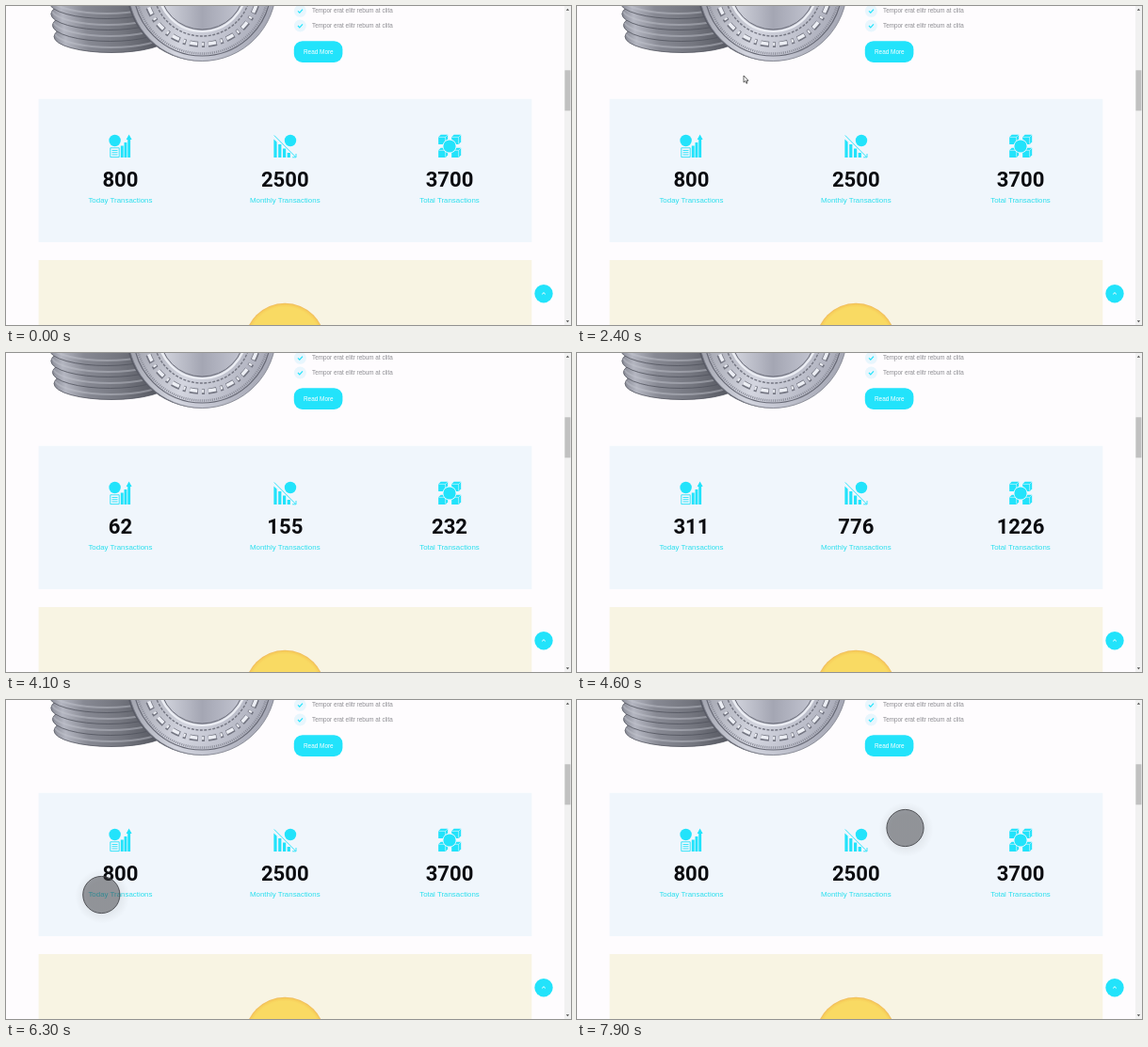
Recreate the animation shown at these times as an HTML page. Size 600 px wide and 339 px high, loop 8 s.

```html
<!DOCTYPE html>
<html lang="en">
<head>
<meta charset="utf-8">
<title>Transaction counters</title>
<style>
  html, body { margin: 0; width: 100%; height: 100%; overflow: hidden; background: #fefcfe; }
  svg { display: block; width: 100vw; height: 100vh; }
  text { font-family: "Liberation Sans", Arial, sans-serif; }
  .num { font: 600 22.1px Roboto, sans-serif; fill: #0b0c10; text-anchor: middle; }
  .label { font-size: 7.9px; fill: #2bdfee; text-anchor: middle; }
  .item { font-size: 6.35px; fill: #8d8d92; }
  .cy { fill: #22e3fb; }
  .line { fill: none; stroke: #22e3fb; }
</style>
</head>
<body>
<svg viewBox="0 0 600 339" preserveAspectRatio="none">
  <defs>
    <linearGradient id="side">
      <stop offset="0" stop-color="#8b8d98"/>
      <stop offset=".1" stop-color="#b4b6c1"/>
      <stop offset=".3" stop-color="#878993"/>
      <stop offset=".6" stop-color="#74767f"/>
      <stop offset="1" stop-color="#4d4f58"/>
    </linearGradient>
    <linearGradient id="face" x1="0" y1=".6" x2="1" y2="1">
      <stop offset="0" stop-color="#a0a2ad"/>
      <stop offset=".4" stop-color="#d3d5df"/>
      <stop offset=".65" stop-color="#bfc1cd"/>
      <stop offset="1" stop-color="#9597a5"/>
    </linearGradient>
    <linearGradient id="inner" x1="0" y1="0" x2="1" y2="0">
      <stop offset="0" stop-color="#d8dae3"/>
      <stop offset=".5" stop-color="#a4a6b3"/>
      <stop offset="1" stop-color="#c6c8d4"/>
    </linearGradient>
    <radialGradient id="gold">
      <stop offset=".9" stop-color="#f9da63"/>
      <stop offset=".96" stop-color="#f7cf5b"/>
      <stop offset="1" stop-color="#efb95c"/>
    </radialGradient>
    <radialGradient id="shade">
      <stop offset=".55" stop-color="#444" stop-opacity=".1"/>
      <stop offset="1" stop-color="#444" stop-opacity="0"/>
    </radialGradient>
  </defs>

  <g id="stack"></g>

  <!-- large silver coin -->
  <g fill="none">
    <circle cx="206.5" cy="-20.5" r="79" fill="#595b66"/>
    <circle cx="208.3" cy="-20" r="78.5" fill="url(#face)" stroke="#7d7f8b" stroke-width=".8"/>
    <circle cx="208.3" cy="-20" r="73" stroke="#676975" stroke-width="1.2"/>
    <circle cx="208.3" cy="-20" r="70.500" stroke="#8a8c98" stroke-width="2.400" stroke-dasharray="1 1.200"/>
    <circle cx="208.3" cy="-20" r="61" stroke="#747682" stroke-width="6" stroke-dasharray="9 4 3 4"/>
    <circle cx="208.3" cy="-20" r="60.500" stroke="#eceef4" stroke-width="3.600" stroke-dasharray="8 5 2 5"/>
    <circle cx="208.3" cy="-20" r="52" stroke="#747682" stroke-width="1.400" stroke-dasharray="3 1.500"/>
    <circle cx="208.3" cy="-20" r="47" fill="url(#inner)" stroke="#eceef4" stroke-width="2.200"/>
    <circle cx="208.3" cy="-20" r="45" stroke="#6d6f7b" stroke-width="1"/>
  </g>

  <!-- list and button -->
  <g id="list"></g>
  <rect x="305.800" y="37.200" width="51.600" height="22.800" rx="9" class="cy"/>
  <text x="316" y="50.500" font-size="6.400" fill="#fff">Read More</text>

  <!-- panels -->
  <path d="M34.600 98.700H558.300V251H34.600z" fill="#f0f6fc"/>
  <path d="M34.600 270H558.300V339H34.600z" fill="#f8f4e3"/>
  <circle cx="296.200" cy="358.600" r="42.800" fill="url(#gold)"/>

  <!-- rising chart -->
  <g class="cy">
    <circle cx="115.600" cy="143" r="6.200"/>
    <path d="M121.800 148.500h2.900V161h-2.900zM125.500 145h2.900v16h-2.900zM129.200 142h2.900v19h-2.900zM130.600 136.500l3 5.500h-6z"/>
    <path d="M110.800 150.800h9.400v9.800h-9.400zM112.500 153.500h6M112.500 155.700h6M112.500 158h6" class="line" stroke-width=".9"/>
  </g>

  <!-- falling chart -->
  <g class="cy">
    <circle cx="302" cy="143" r="6.200"/>
    <path d="M284.400 141.500l3.200 3V161h-3.200zM289.200 147h3.200v14h-3.200zM294 151.500h3.200v9.500h-3.200zM298.700 156h3.200v5h-3.200z"/>
    <path d="M284.800 137.500L307.500 160.300M308 157v3.800h-3.800" class="line" stroke-width=".9"/>
  </g>

  <!-- linked blocks -->
  <g id="blocks" class="cy"></g>

  <g id="stats"></g>

  <circle cx="571" cy="305.700" r="9.700" class="cy"/>
  <path d="M569.200 306.300l1.800-1.700 1.800 1.700" fill="none" stroke="#fff" stroke-width="1"/>

  <!-- scrollbar -->
  <path d="M593 0h7v339h-7z" fill="#f1f1f1"/>
  <path d="M593.400 68.300h6v43h-6z" fill="#c1c1c1"/>
  <path d="M594.700 4.800l1.700-2 1.700 2zM594.700 334.200l1.700 2 1.700-2z" fill="#505050"/>

  <path id="arrow" d="M0 0V7.200L1.700 5.700 2.900 8.300 4 7.800 2.900 5.300H5z" fill="#fff" stroke="#222" stroke-width=".7"/>
  <g id="spot">
    <circle cx="1" cy="1.500" r="29" fill="url(#shade)"/>
    <circle r="19.600" fill="#3c3c40" fill-opacity=".48" stroke="#45464a" stroke-width=".9"/>
  </g>
</svg>
<script>
const $ = id => document.getElementById(id);
const LOOP = 8000, STEP = 100, RESET = 4000;

// centre x, label, final value, value at 4600 ms, gain per 900 ms
const stats = [
  [121.4, 'Today', 800, 311, 448],
  [296.3, 'Monthly', 2500, 776, 1118],
  [471, 'Total', 3700, 1226, 1789]
];

// time, x, y
const arrowPath = [
  [1600, 228, 190], [1900, 170, 112], [2100, 150, 88], [2400, 177, 74],
  [2800, 196, 76], [3400, 210, 89.5], [4000, 210, 89.5]
];
const spotPath = [
  [5200, 214, 98], [5500, 136.3, 136.4], [5700, 118, 156], [6000, 105, 186],
  [6300, 101.3, 207], [6600, 174, 204], [7000, 225, 182], [7500, 286, 158],
  [7800, 348.5, 136], [8000, 348.5, 136]
];

// bottom coin first, each one above a little further left
$('stack').innerHTML = [0, 1, 2, 3].map(i => {
  const x = 112 - 1.6 * i, y = 32.5 - 12 * i;
  const arc = dy => `M${x - 60} ${y - dy}A61 17 0 0 0 ${x + 60} ${y - dy}`;
  return `<ellipse cx="${x}" cy="${y}" rx="61" ry="17" fill="url(#side)" stroke="#51535d" stroke-width=".8"/>
    <path d="${arc(2.5)}" fill="none" stroke="#c3c5ce" stroke-opacity=".45" stroke-width="2"/>`;
}).join('');

$('list').innerHTML = [5.3, 21].map(y =>
  `<circle cx="312.400" cy="${y}" r="6.500" fill="#e8f6fd"/>
   <path d="M310 ${y}l1.800 1.800 3.200-3.500" class="line" stroke-width="1.200"/>
   <text class="item" x="325" y="${y + 1.7}">Tempor erat elitr rebum at clita</text>`
).join('');

$('blocks').innerHTML = [[-1, -1], [1, -1], [-1, 1], [1, 1]].map(([sx, sy]) =>
  `<g transform="translate(${471 + sx * 7} ${149 + sy * 7}) scale(1.15)">
   <path d="M-4.200-2.500L-2-4.500H4.500V2L2.500 4.300H-4.200z"/>
   <path d="M-4-2.300H2.300V4M2.300-2.300L4.300-4.300" fill="none" stroke="#f0f6fc" stroke-width=".5"/></g>`
).join('') +
  '<circle cx="471" cy="149" r="7.400" fill="#f0f6fc"/><circle cx="471" cy="149" r="6.600"/>';

$('stats').innerHTML = stats.map(([x, name]) =>
  `<text class="num" x="${x}" y="192"></text>
   <text class="label" x="${x}" y="209.400">${name} Transactions</text>`
).join('');
const nums = document.querySelectorAll('.num');

function place(el, path, t) {
  const i = path.findIndex(p => p[0] > t);
  el.style.display = i > 0 ? '' : 'none';
  if (i < 1) return;
  const [t0, x0, y0] = path[i - 1], [t1, x1, y1] = path[i];
  const k = (t - t0) / (t1 - t0);
  el.setAttribute('transform', `translate(${x0 + (x1 - x0) * k} ${y0 + (y1 - y0) * k})`);
}

function draw(now) {
  const t = Math.floor(now % LOOP / STEP) * STEP;
  stats.forEach(([, , end, base, gain], i) => {
    const v = Math.round(base + gain * (t - 4600) / 900);
    nums[i].textContent = t < RESET ? end : Math.max(0, Math.min(end, v));
  });
  place($('arrow'), arrowPath, t);
  place($('spot'), spotPath, t);
}

const start = performance.now();
(function tick() {
  draw(performance.now() - start);
  requestAnimationFrame(tick);
})();
</script>
</body>
</html>
```
